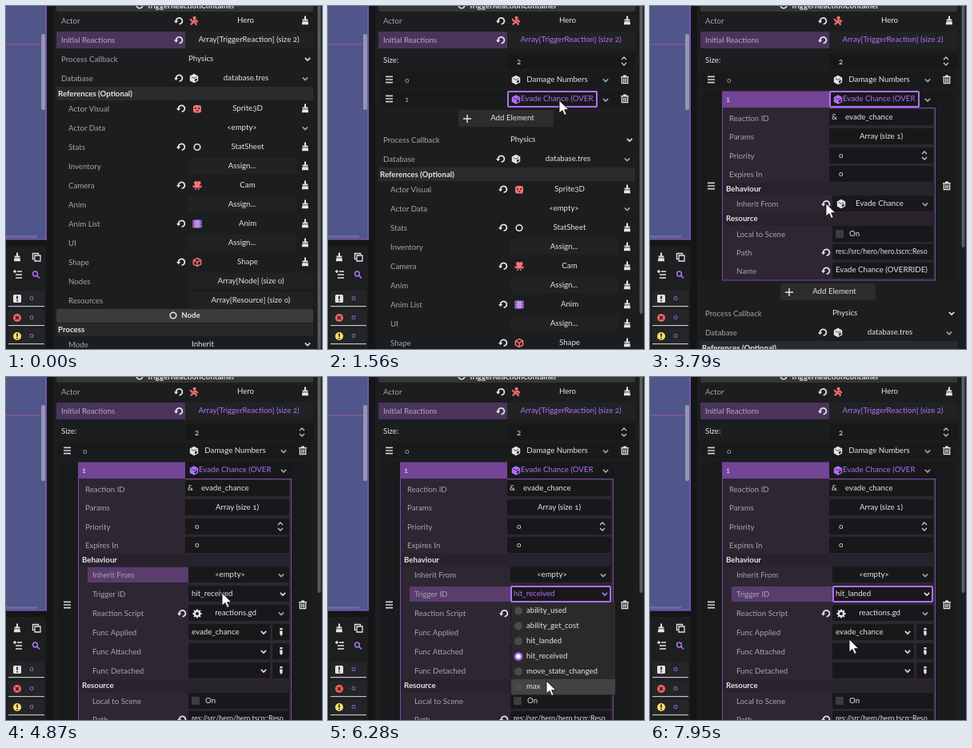
An HTML page that plays this animation: 395 px wide and 429 px high, repeating every 8 s.

```html
<!DOCTYPE html>
<html lang="en">
<head>
<meta charset="utf-8">
<title>Inspector</title>
<style>
html, body { margin: 0; width: 100%; height: 100%; overflow: hidden; background: #141517; }
svg { display: block; width: 395px; height: 429px; font: 9.7px Lato, "Open Sans", sans-serif; font-variant-numeric: oldstyle-nums; }
text { white-space: pre; }
</style>
</head>
<body>
<svg id="stage" viewBox="0 0 395 429"><g id="scene"></g><g id="cursor"><path d="M0 0V16L4 12.6L6.6 18.5L9.2 17.3L6.6 11.7H12Z" fill="#fff" stroke="#111" stroke-width=".9"/></g></svg>
<script>
const LOOP = 8000;
const PURPLE = '#b070f6', WHITE = '#e4e4e6', GREY = '#a6a6a9', RED = '#fb7373';
const PANEL = '#1c1d1f', FIELD = '#18181a', BUTTON = '#212224';

const rect = (x, y, w, h, fill, extra = '') =>
  `<rect x="${x}" y="${y}" width="${w}" height="${h}" fill="${fill}" ${extra}/>`;
// The typeface has old-style figures, so zero has the shape of a small o.
const glyphs = s => s.replace(/0/g, 'o').replace(/&/g, '&amp;').replace(/</g, '&lt;');
const text = (x, y, s, fill = WHITE, extra = '') =>
  `<text x="${x}" y="${y + 3.4}" fill="${fill}" ${extra}>${glyphs(s)}</text>`;
const mid = (x, y, s, fill = WHITE) => text(x, y, s, fill, 'text-anchor="middle"');
const bold = (x, y, s, extra = '') => text(x, y, s, WHITE, 'font-weight="700" ' + extra);
const label = (x, y, s, fill = GREY) => text(x, y + .6, s, fill);
const at = (x, y, body) => `<g transform="translate(${x} ${y})">${body}</g>`;
const fill = (d, c = WHITE) => `<path d="${d}" fill="${c}"/>`;
const line = (d, c = WHITE, w = 1.5) => `<path d="${d}" fill="none" stroke="${c}" stroke-width="${w}"/>`;
const outline = (x, y, w, h) => rect(x, y, w, h, 'none', `stroke="${PURPLE}" stroke-width="2" rx="1"`);

const icons = {
  revert: () => line('M-3.4 .5A3.9 3.9 0 1 1 .6 4.2', WHITE, 1.8) + fill('M-6 0H-.8L-3.4 3.2Z'),
  broom: () => fill('M-1-5.5H1V-1.5H3.4V.4H-3.4V-1.5H-1ZM-3.6 1.2H3.6L4 5.2H-4.2Z'),
  chevron: (c = WHITE) => line('M-3.2-1.6L0 1.6L3.2-1.6', c),
  spin: () => line('M-3-2L0-5L3-2M-3 2L0 5L3 2', '#c4c4c6', 1.4),
  cube: (c = WHITE) => fill('M0-5.8L5.2-3.1V3L0 5.8L-5.2 3V-3.1Z', c) +
    line('M-3.4-1.9L0-.1L3.4-1.9', FIELD, .7) + fill('M1 1.3L3.7-.1V2.4L1 3.8Z', FIELD),
  ring: () => '<circle r="3.8" fill="none" stroke="#e4e4e6" stroke-width="1.6"/>',
  frame: () => line('M0-5L4.6-2.6V2.6L0 5L-4.6 2.6V-2.6ZM-4.6-2.6L0-.2L4.6-2.6M0-.2V5', RED, 1.5),
  face: () => rect(-5, -4.6, 10, 9.6, RED, 'rx="2.8"') +
    fill('M-3-1.6H-1.4V.6H-3ZM1.4-1.6H3V.6H1.4ZM-2 2H2L0 3.6Z', PANEL),
  figure: () => `<circle cx=".6" cy="-3.6" r="2.1" fill="${RED}"/>` +
    line('M-4.6-2.4L-3 .2L3 -.4L4.6 1.6M0-1L-.4 1.8L-4.4 4.6M-.4 1.8L2.4 2.8L2.8 5.6', RED, 2),
  camera: () => `<circle cx="-1.6" cy="-3" r="2.4" fill="${RED}"/><circle cx="2.2" cy="-3" r="2.4" fill="${RED}"/>` +
    fill('M-3-1.6H3V1L5.4-.4V3.4L3 2V3H-3ZM-5.4-.6L-3 .6V2L-5.4 2.8ZM-2.6 3.8H-1V5.6H-2.6ZM1 3.8H2.6V5.6H1Z', RED),
  film: () => rect(-5.5, -5, 11, 10, '#bd8df5') +
    line('M-4-5V5M4-5V5', PANEL, 1.2).replace('/>', ' stroke-dasharray="1.4 1.4"/>'),
  bars: () => line('M-4.5-3.6H4.5M-4.5 0H4.5M-4.5 3.6H4.5', '#cfcfd2', 1.6),
  trash: () => fill('M-5-4H-2V-5.4H2V-4H5V-2.6H-5Z') +
    line('M-3.6-2V4.6H3.6V-2M-1.2-1.4V3.4M1.2-1.4V3.4', WHITE, 1.4),
  gear: () => '<circle r="3.2" fill="none" stroke="#e4e4e6" stroke-width="2.4"/>' +
    line('M0-5.6V-3.4M0 3.4V5.6M-5.6 0H-3.4M3.4 0H5.6M-4-4L-2.6-2.6M4 4L2.6 2.6M-4 4L-2.6 2.6M4-4L2.6-2.6', WHITE, 1.8),
  info: () => fill('M-1.6-5H1.6V-2.8H-1.6ZM-2-1.6H1.6V3L0 5L-1.6 3Z'),
  plus: () => line('M-5 0H5M0-5V5'),
};
const icon = (name, x, y, color) => at(x, y, icons[name](color));

// Cursor travel: start, end, number of steps, destination.
const moves = [
  [120, 600, 5, 300, 44], [840, 1560, 7, 289, 118], [2190, 2310, 2, 247, 232],
  [2680, 2680, 1, 262, 238], [2800, 2920, 2, 258, 247], [3170, 3170, 1, 259, 247],
  [3420, 3540, 2, 220, 247], [4260, 4260, 1, 220, 248], [4630, 4870, 3, 270, 270],
  [5590, 6280, 7, 273, 380], [6400, 6520, 2, 272, 330], [6640, 6760, 2, 273, 394],
  [6990, 7230, 3, 270, 330], [7470, 7710, 3, 266, 291], [7950, 7950, 1, 249, 328],
];

function cursorAt(t) {
  let x = 389, y = 184;
  for (const [start, end, steps, toX, toY] of moves) {
    if (t < start) break;
    const step = steps > 1 ? 1 + Math.floor((t - start) * (steps - 1) / (end - start) + .01) : 1;
    const p = Math.min(1, step / steps);
    x += (toX - x) * p;
    y += (toY - y) * p;
  }
  return [Math.round(x), Math.round(y)];
}

function leftDock() {
  let s = rect(0, 0, 50, 291, '#50568a') + rect(0, 47.5, 50, 1, '#a4599b') +
    rect(44, 35, 5, 95, '#9296b4', 'rx="2"') + rect(0, 287, 39, 3, '#686d9a') +
    rect(49.5, 0, 1.5, 292.5, '#7f5ab6') + rect(0, 291, 51, 1.5, '#7f5ab6') +
    rect(0, 300, 50, 129, '#1d1e20') + icon('broom', 14, 314) +
    line('M35 316.5H33.5V309.5H40.5V311M36 312H43V319H36Z', WHITE, 1.3) +
    line('M9 332H13M11 330V334M14 332H20M12 336H20M12 340H20', WHITE, 1.4) +
    `<circle cx="36.5" cy="335" r="2.9" fill="none" stroke="${PURPLE}" stroke-width="1.5"/>` +
    line('M38.5 337L42 340.5', PURPLE, 1.7);
  ['#e4e4e6', '#ff5f5f', '#ffde66'].forEach((c, i) => {
    const y = 366 + i * 24 - (i > 1);
    s += rect(3, y - 10, 45, 19, '#242527', 'rx="2"') + rect(3, y + 9, 45, 1.2, '#c4c4c8') +
      rect(9, y - 5, 10, 10, c, `rx="${i ? 5 : 1.5}"`) +
      (i === 1 ? line(`M12 ${y - 2}L16 ${y + 2}M16 ${y - 2}L12 ${y + 2}`, '#222', 1.5)
        : line(`M14 ${y - 3.4}V${y + .8}M14 ${y + 2}V${y + 3.6}`, '#222', 1.7)) +
      mid(32, y - 1, '0', PURPLE);
  });
  return s;
}

const references = [
  ['Actor Visual', 'Sprite3D', 'face'], ['Actor Data', '<empty>'], ['Stats', 'StatSheet', 'ring'],
  ['Inventory'], ['Camera', 'Cam', 'camera'], ['Anim'], ['Anim List', 'Anim', 'film'],
  ['UI'], ['Shape', 'Shape', 'frame'], ['Nodes', 'Array[Node] (size 0)'], ['Resources', 'Array[Resource] (size 0)'],
];

// Everything below the reaction array.
function lowerRows() {
  let s = label(69, 66, 'Process Callback') + text(228, 65.5, 'Physics') + icon('chevron', 377, 66.5) +
    label(69, 90, 'Database') + icon('revert', 216, 90) + icon('cube', 235, 90.5) +
    mid(300, 89.5, 'database.tres') + icon('chevron', 374, 91, GREY) +
    rect(63, 101, 321, 17, '#2a2b2d') + bold(65, 109.5, 'References (Optional)');
  references.forEach(([name, value, symbol], i) => {
    const y = 128 + i * 24, isArray = i > 8, isEmpty = value === '<empty>';
    s += label(78, y, name);
    if (!symbol && !isEmpty) s += rect(228, y - 10, isArray ? 156 : 135, 20, BUTTON, 'rx="2"');
    s += mid(isArray ? 306 : symbol ? 302 : 295, y - .5, value || 'Assign...');
    if (symbol) s += icon('revert', 219, y) + icon(symbol, 239, y + .5);
    if (isEmpty) s += icon('chevron', 374, y + 1, GREY);
    else if (!isArray) s += icon('broom', 374, y);
  });
  return s + rect(63, 379, 321, 17, '#3a3b3d', 'rx="2"') + icon('ring', 209, 387) +
    bold(231, 387, 'Node', 'text-anchor="middle"') + rect(63, 397, 321, 16, '#28292b') +
    bold(65, 404.5, 'Process') + label(78, 423, 'Mode') + text(232, 422.5, 'Inherit') + icon('chevron', 377, 423);
}

function reactionBody({ cleared, trigger, menu, chosen }) {
  const shift = cleared ? 120 : 0;
  const field = (y, x = 228, w = 354 - x) => rect(x, y - 10, w, 20, FIELD, 'rx="1"');
  const heading = (y, s) => rect(91, y - 8, 265, 16, '#28222d') + bold(95, y - .5, s);
  const highlight = y => rect(102, y - 9, 126, 19, '#5a3c6d');
  let s = rect(90.5, 107, 266, 236 + shift, '#2d2633', 'stroke="#7b4aa0"') +
    rect(224, 106, 134, 21, FIELD) + rect(90, 107, 134, 20, '#744497') + line('M224 127.5H357', '#7b4aa0', 1) +
    text(95, 117, '1') +
    label(99, 140, 'Reaction ID') + field(139, 224) + text(227, 139, '&') + text(244, 139, 'evade_chance') +
    label(99, 163, 'Params') + field(163, 224) + mid(289, 162.5, 'Array (size 1)') +
    label(99, 187, 'Priority') + field(187, 224) + text(236, 186.5, '0') + icon('spin', 343, 187) +
    label(99, 210, 'Expires In') + field(210, 224) + text(236, 209.5, '0') +
    heading(229, 'Behaviour') + (cleared && !trigger ? highlight(247) : '') +
    label(108, 247, 'Inherit From') + field(247) + icon('chevron', 344, 248, GREY);
  if (cleared) {
    s += mid(280, 246.5, '<empty>') + (trigger ? highlight(271) : '') + label(108, 271, 'Trigger ID') + field(271) +
      text(232, 270.5, chosen ? 'hit_landed' : 'hit_received', menu ? PURPLE : WHITE) +
      icon('chevron', 346, 271.5, menu ? PURPLE : WHITE) + (trigger ? outline(229, 262, 124, 19) : '') +
      label(108, 295, 'Reaction Script') + icon('revert', 220, 295.5) + field(295) + icon('gear', 239, 296) +
      mid(287, 294.5, 'reactions.gd') + icon('chevron', 344, 296, GREY);
    ['Applied', 'Attached', 'Detached'].forEach((name, i) => {
      const y = 319 + i * 24;
      s += label(108, y, 'Func ' + name) + field(y, 228, 102) + field(y, 333) + text(232, y - .5, i ? '' : 'evade_chance') +
        icon('chevron', 322, y + .5) + icon('info', 344, y);
    });
  } else {
    s += icon('revert', 220, 247.5) + icon('cube', 239, 247.5) + mid(287, 246.5, 'Evade Chance');
  }
  return s + at(0, shift, heading(266.5, 'Resource') + label(108, 285, 'Local to Scene') + field(285) +
    rect(232, 280, 10, 10, '#3d3d40', 'rx="1"') + text(249, 284.5, 'On') +
    label(108, 308, 'Path') + icon('revert', 220, 308) + field(307.5) +
    text(232, 307, 'res://src/hero/hero.tscn::Reso', WHITE, 'font-size="8.8"') +
    label(108, 331, 'Name') + icon('revert', 220, 331) + field(330.5) + text(232, 329.5, 'Evade Chance (OVERRIDE)'));
}

function arrayRows(state) {
  const { expanded, cleared, focus } = state;
  const grow = !expanded ? 0 : cleared ? 337 : 217;
  const center = !expanded ? 116 : cleared ? 285 : 225;
  const color = focus || expanded ? PURPLE : WHITE;
  const row = (top, h, y) => rect(65, top, 316, h, '#191a1c', 'rx="2"') + icon('bars', 76.5, y) + icon('trash', 371, y);
  return text(69, 67.5, 'Size:') + rect(224, 59, 160, 20, FIELD) + text(236, 69.5, '2') + icon('spin', 370, 69) +
    row(82, 20, 92) + label(96, 92, '0') + icon('cube', 235, 92.5) + mid(286.5, 91.5, 'Damage Numbers') + icon('chevron', 347, 93, GREY) +
    row(106, 21 + grow, center) + (expanded ? reactionBody(state) : label(96, 116, '1')) +
    icon('cube', 235, 117, color) + text(241, 115.5, 'Evade Chance (OVER', color) + icon('chevron', 347, 117.5, GREY) +
    (focus ? outline(225, 107, 111, 19) : '') +
    at(0, grow, rect(163, 130, 119, 21, '#2b2c2e', 'rx="2"') + icon('plus', 174, 141) + mid(230.5, 140, 'Add Element'));
}

function dropdown(hover) {
  const options = ['ability_used', 'ability_get_cost', 'hit_landed', 'hit_received', 'move_state_changed', 'max'];
  return rect(229, 282, 130, 116, '#2a2a2c') + options.map((name, i) => {
    const y = 292 + i * 19, on = i === 3;
    return (i === hover ? rect(229, y - 9, 130, 19, '#434345') : '') +
      `<circle cx="238" cy="${y + .5}" r="${on ? 4 : 5}" fill="${on ? '#fff' : '#4b4b4e'}" ${on ? `stroke="${PURPLE}" stroke-width="2.4"` : ''}/>` +
      text(248, y - .5, name);
  }).join('');
}

function scene(state) {
  const { open, expanded, cleared, focus, menu, hover } = state;
  const shift = !open ? 0 : !expanded ? 101 : cleared ? 438 : 318;
  const barEnd = !open ? 429 : !expanded ? 385 : cleared ? 270 : 302;
  return rect(0, 0, 395, 429, '#141517') + leftDock() + rect(59, 0, 336, 429, PANEL) +
    rect(63, -10, 321, 17, '#353638', 'rx="2"') + icon('ring', 167, -1) +
    bold(231, -.5, 'TriggerReactionContainer', 'text-anchor="middle"') +
    label(69, 18, 'Actor') + icon('revert', 216, 18.5) + icon('figure', 235, 18.5) + mid(299.5, 17.5, 'Hero') + icon('broom', 374, 18) +
    rect(63, 32, 161, 21, '#4a345b') + rect(224, 32, 160, 21, BUTTON) +
    label(69, 42, 'Initial Reactions', '#b5aabd') + icon('revert', 216, 42.5) +
    mid(303.5, 41.5, 'Array[TriggerReaction] (size 2)', open ? PURPLE : WHITE) +
    (open && !focus && !expanded ? outline(225, 33, 158, 19) : '') +
    (open ? arrayRows(state) : '') + at(0, shift, lowerRows()) +
    rect(389.5, -4, 4, barEnd + 4, '#5b5c5f', 'rx="2"') + (menu ? dropdown(hover) : '');
}

const sceneNode = document.getElementById('scene');
const cursorNode = document.getElementById('cursor');
let shown = '';

function render(t) {
  const [x, y] = cursorAt(t);
  const menu = t >= 5240 && t < 7350;
  const state = {
    open: t >= 840, expanded: t >= 1680, cleared: t >= 4030, trigger: t >= 5240,
    focus: t >= 1560 && t < 4030, menu, chosen: t >= 7350,
    hover: menu ? Math.floor((y - 283) / 19) : -1,
  };
  const key = JSON.stringify(state);
  if (key !== shown) {
    sceneNode.innerHTML = scene(state);
    shown = key;
  }
  cursorNode.setAttribute('transform', `translate(${x} ${y})`);
  cursorNode.setAttribute('visibility', t < 120 ? 'hidden' : 'visible');
}

const begin = performance.now();
function tick() {
  render((performance.now() - begin) % LOOP);
  requestAnimationFrame(tick);
}
tick();
</script>
</body>
</html>
```
